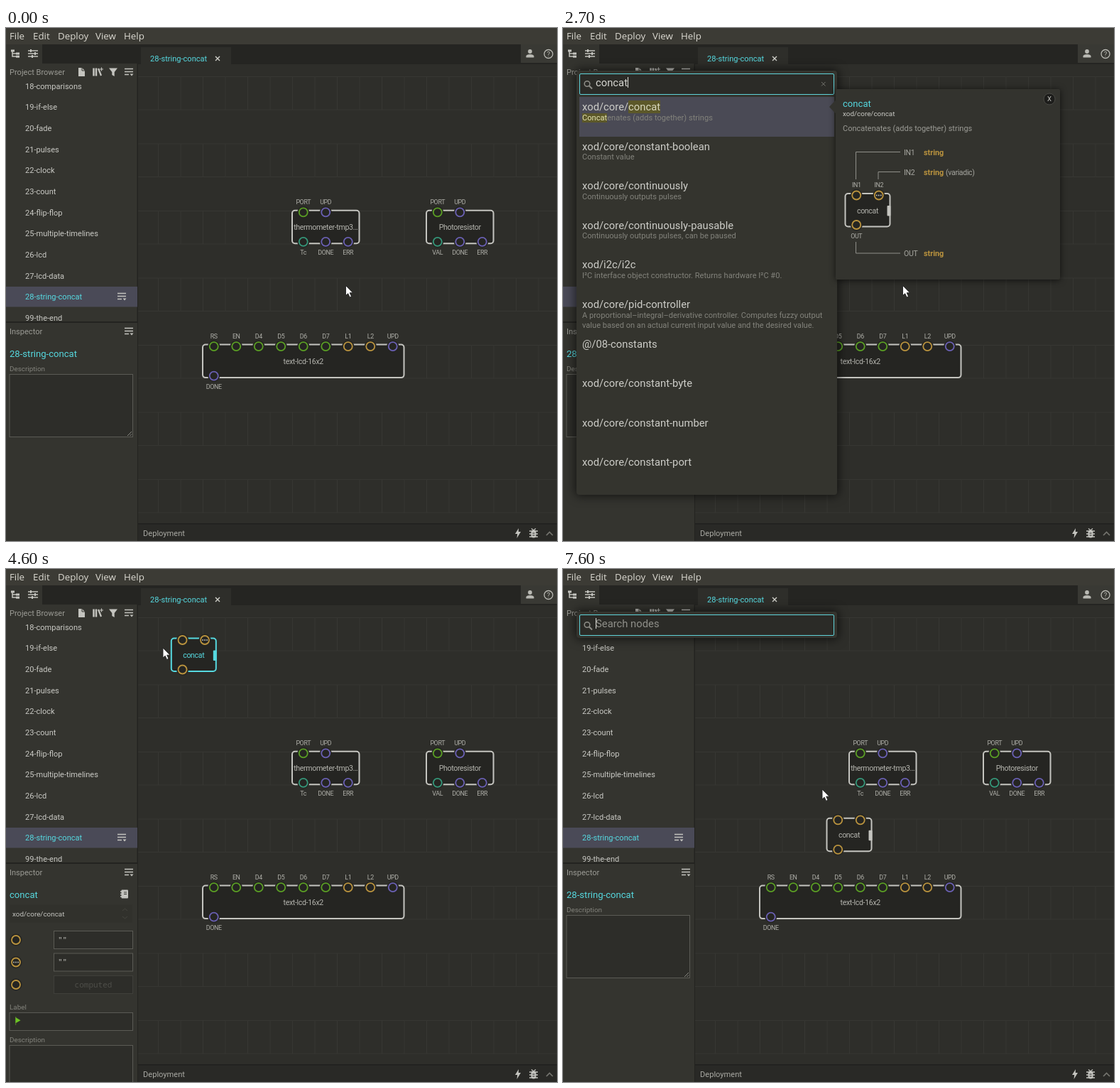
These frames come from a looping animation (776x722 px, 8 s). An HTML page:

```html
<!DOCTYPE html>
<html lang="en">
<head>
<meta charset="utf-8">
<title>Patch editor</title>
<style>
html, body { margin: 0; width: 100%; height: 100%; overflow: hidden; background: #2e2e2a; }
body { position: relative; font-family: Roboto, "Noto Sans", sans-serif; }
svg { position: absolute; left: 0; top: 0; overflow: visible; }
svg text { white-space: pre; }
.cn { letter-spacing: -.35px; }
.menu { font-family: "Open Sans", "Noto Sans", sans-serif; }
.mono { font-family: "Noto Sans Mono", "DejaVu Sans Mono", monospace; }
#popup { position: absolute; left: 19px; top: 60px; width: 367px; background: #34342e; border-radius: 4px; box-shadow: 0 0 14px 2px rgba(0,0,0,.6); overflow: hidden; }
#popup div { position: absolute; white-space: pre; }
#input { left: 3.5px; top: 3.5px; width: 357px; height: 28px; border: 1.5px solid #5fd3da; border-radius: 2px; background: #2b2b27; }
#query { left: 27px; top: 7px; font-size: 14.8px; line-height: 20px; color: #d6d6d1; }
#query.empty { color: #8f8f89; }
#query i { display: inline-block; width: 1px; height: 15px; background: #e0e0da; vertical-align: -2px; margin-right: -1px; }
.row { left: 4px; width: 359px; height: 55.6px; }
.row.on { background: #4a4a55; }
.name { left: 4px; top: 4px; font-size: 14.8px; line-height: 20px; color: #cdcdc8; }
.about { left: 4px; top: 22.5px; font-size: 11.1px; line-height: 14px; color: #83837c; }
mark { background: #5c5829; color: #d9d8bd; }
.about mark { color: #e6e5b4; }
#bar { left: 355px; top: 38px; width: 6px; height: 363px; border-radius: 3px; background: #797973; }
</style>
</head>
<body>
<svg id="stage" width="776" height="722"></svg>
<div id="popup"></div>
<svg id="over" width="776" height="722"></svg>
<script>
const $ = id => document.getElementById(id);
const SLOT = 31.5, CYAN = '#56d9e0', PALE = '#c4c4bf', DIM = '#83837c', DARK = '#252522';
const HUE = { g: '#5a9e24', p: '#6a60b4', t: '#35987a', o: '#ba933e', b: '#93609b' };

const text = (x, y, s, size, fill, more = '') =>
  `<text x="${x}" y="${y + size * .345}" font-size="${size}" fill="${fill}" ${more}>${s}</text>`;
const mid = 'text-anchor="middle" class="cn"';
const rect = (x, y, w, h, fill, more = '') =>
  `<rect x="${x}" y="${y}" width="${w}" height="${h}" fill="${fill}" ${more}/>`;
const line = (d, color = PALE, width = 1.5, fill = 'none') =>
  `<path d="${d}" stroke="${color}" stroke-width="${width}" fill="${fill}"/>`;
const solid = (d, fill = PALE) => `<path d="${d}" fill="${fill}"/>`;
const at = (x, y, body) => `<g transform="translate(${x} ${y})">${body}</g>`;
const field = (x, y, w, h, edge = '#5b5b55') => rect(x, y, w, h, '#2d2d29', `stroke="${edge}"`);

function port(x, y, hue, dots) {
  const dot = d => `<circle cx="${x + d}" cy="${y}" r=".9" fill="${PALE}"/>`;
  return `<circle cx="${x}" cy="${y}" r="8.5" fill="${DARK}"/>` +
    `<circle cx="${x}" cy="${y}" r="6" fill="${DARK}" stroke="${HUE[hue]}" stroke-width="1.8"/>` +
    (dots ? [-3, 0, 3].map(dot).join('') : '');
}

// Ports are written "LABEL:hue"; "+" after the hue marks a variadic port.
function node(x, y, slots, label, ins, outs, o = {}) {
  const edge = o.edge || PALE, w = slots * SLOT;
  const row = (list, py, ly) => list.split(' ').filter(Boolean).map((p, i) => {
    const [name, hue] = p.split(':'), px = x + SLOT * (i + .5);
    return port(px, y + py, hue[0], hue[1]) + text(px, y + ly, name, 8.9, '#b0b0aa', mid);
  }).join('');
  return rect(x, y, w, 46.5, DARK, `rx="4" stroke="${edge}" stroke-width="2"`) +
    (o.grip ? rect(x + w - 4, y + 17, 5, 14.5, edge, 'rx="1"') : '') +
    text(x + w / 2, y + 24, label, 10.6, o.edge || '#b4b4ae', mid) +
    row(ins, 2.5, -12) + row(outs, 44, 59.5);
}

const listIcon = line('M-6-4.5h12M-6-.5h12M-6 3.5h6') + solid('M1.5 2.5h5l-2.5 3z');

function backdrop() {
  let grid = '';
  for (let k = 0; k < 7; k++) {
    const y = 68.5 + k * 94.5;
    grid += `M186 ${y}H776M186 ${y + 46.5}H776`;
    for (let x = 214.5; x < 776; x += SLOT) grid += `M${x} ${y}v46.5`;
  }
  const files = ['18-comparisons', '19-if-else', '20-fade', '21-pulses', '22-clock', '23-count', '24-flip-flop',
    '25-multiple-timelines', '26-lcd', '27-lcd-data', '28-string-concat', '99-the-end'];
  const menus = [[5, 'File'], [38, 'Edit'], [73, 'Deploy'], [126, 'View'], [166, 'Help']];
  return rect(186, 50, 590, 648, '#2e2e2a') + line(grid, '#373733', 1) +
    rect(0, 23, 776, 28, '#252522') + rect(0, 23, 51, 28, '#34342f') +
    rect(190, 27, 127, 24, '#2e2e2a') + rect(725, 23, 51, 26, '#393934') +
    rect(0, 0, 776, 23, '#3c3b35') +
    menus.map(([x, s]) => text(x, 11, s, 13.3, '#dcdad2', 'class="menu"')).join('') +
    text(203, 43, '28-string-concat', 11.05, CYAN) +
    line('M295 40l6 6M301 40l-6 6', '#d0d0ca', 1.4) +
    rect(0, 50, 185, 672, '#34342f') + rect(184.5, 50, 1.5, 672, '#232320') +
    at(13, 36, line('M-4-4V4H2M-4 0H2') + rect(-6, -5.5, 5, 3, PALE) + rect(1, -1.5, 5, 3, PALE) + rect(1, 2.7, 5, 3, PALE)) +
    at(38, 36, line('M-7-4H7M-7 0H7M-7 4H7') + line('M-3-6v4M3-2v4M-1 2v4', PALE, 2)) +
    at(738, 36, `<circle cy="-3" r="2.9" fill="#b9b9b3"/>` + solid('M-5.5 5.5V3.5Q-5 1 0 1T5.5 3.5V5.5z', '#b9b9b3')) +
    `<circle cx="764" cy="36.5" r="6" fill="none" stroke="#b9b9b3" stroke-width="1.3"/>` +
    text(764, 36.5, '?', 9.5, '#b9b9b3', 'text-anchor="middle"') +
    text(5, 62, 'Project Browser', 11.05, '#9b9b95') +
    at(106, 62, solid('M-4-6H1L5-2V6H-4z') + line('M1-6V-2H5', '#34342f', 1)) +
    at(128, 62, line('M-4.5-5.5V5.5M-1-5.5V5.5', PALE, 2.5) + line('M2-5L6 5', PALE, 2.2) + line('M4-4h5M6.5-6.5v5', PALE, 1.2)) +
    at(151, 62, solid('M-6-5.5H6L1.7 0V6L-1.7 4V0z')) + at(173, 62, listIcon) +
    rect(0, 364, 185, 28.5, '#4a4a57') +
    files.map((s, i) => text(27, 82 + i * 29.65, s, 11.05, i == 10 ? CYAN : '#c9c9c4')).join('') +
    at(163, 378, listIcon) +
    rect(0, 413, 185, 309, '#34342f') + rect(0, 413, 185, 2, '#232320') +
    text(5, 427.5, 'Inspector', 11.05, '#9b9b95') + at(173, 427, listIcon) +
    rect(186, 697.5, 590, 24.5, '#292926') + rect(186, 697, 590, 1.5, '#20201e') +
    text(193, 711.5, 'Deployment', 11.1, '#a9a9a3') +
    at(721, 711, solid('M1-7L-4 1H-.8L-1.5 7L4-2H.7z')) +
    at(743, 711, line('M-6-3H6M-6 1H6M-6 5H6M-3-6.5L0-4L3-6.5', PALE, 1.3) + rect(-3.5, -4.5, 7, 11, PALE, 'rx="3.5"') + line('M-1.5 0h3M-1.5 3h3', '#292926', 1)) +
    line('M761 714l4.5-4.5 4.5 4.5', '#74746e', 1.7) +
    node(403, 256.8, 3, 'thermometer-tmp3…', 'PORT:g UPD:p', 'Tc:t DONE:p ERR:p') +
    node(592, 256.8, 3, 'Photoresistor', 'PORT:g UPD:p', 'VAL:t DONE:p ERR:p') +
    node(277, 445.6, 9, 'text-lcd-16x2', 'RS:g EN:g D4:g D5:g D6:g D7:g L1:o L2:o UPD:p', 'DONE:p');
}

const patchInfo = text(5, 458, '28-string-concat', 13.1, CYAN) + text(5, 480, 'Description', 9.9, DIM) +
  field(5, 487.5, 173.5, 88) + line('M171 574l6-6M174.5 574l2.5-2.5', '#8a8a84', 1);

const nodeInfo = text(5, 458, 'concat', 13.1, CYAN) +
  at(167, 457.5, rect(-4.5, -6, 9.5, 12, PALE, 'rx="1"') + line('M-6-3.5h3M-6 0h3M-6 3.5h3', PALE, 1.3) + line('M-1-2.5h4M-1 0h4', '#34342f', 1.2)) +
  rect(5, 472.5, 173, 25, '#31312c') + text(9, 485.5, 'xod/core/concat', 9.9, '#c4c4bf') +
  line('M164 481l3.5-3 3.5 3M164 489l3.5 3 3.5-3', '#45453f', 1) +
  [522, 553.5, 585].map((y, i) => port(14, y, 'o', i == 1) +
    field(67.5, y - 12.5, 111, 25, i < 2 ? '#5b5b55' : '#3f3f3a') +
    (i < 2 ? text(73, y, '""', 11, '#c4c4bf', 'class="mono"')
      : text(123, y + .5, 'computed', 11, '#4e4e49', 'class="mono" text-anchor="middle"'))).join('') +
  text(5, 617, 'Label', 9.9, DIM) + field(5, 624.5, 173.5, 25) +
  line('M13.7 630v12', '#58762f', 1) + solid('M13.5 631l7 4.3-7 4z', '#6cc424') +
  text(5, 663, 'Description', 9.9, DIM) + field(5, 670.5, 173.5, 60);

$('stage').innerHTML = backdrop() +
  `<g id="patch">${patchInfo}</g><g id="node">${nodeInfo}</g>` +
  rect(0, 0, 63, 46.5, '#3e7f84', 'id="ghost" rx="4"') +
  `<g id="picked">${node(0, 0, 2, 'concat', ':o :o+', ':o', { edge: CYAN, grip: 1 })}</g>` +
  `<g id="placed">${node(371.5, 350.8, 2, 'concat', ':o :o', ':o', { grip: 1 })}</g>`;
$('over').innerHTML = '<g id="preview"></g><path id="cursor" d="M0 0V14L3.2 11.2L5.6 16.4L8 15.3L5.7 10.2H10z" fill="#fff" stroke="#222" stroke-width=".9"/>';

const about = {
  concat: 'Concatenates (adds together) strings', 'constant-boolean': 'Constant value',
  continuously: 'Continuously outputs pulses', 'continuously-pausable': 'Continuously outputs pulses, can be paused',
  clip: 'Clips an input value so that the value is always inside a [MIN, MAX]\nrange.',
  cos: 'Calculates cosine of an angle.', cube: 'Computes the cube (i.e. x³) of an input value.',
  clock: 'Outputs pulses at regular intervals', 'console-log': 'Outputs a line of text to the board standard debug interface',
  i2c: 'I²C interface object constructor. Returns hardware I²C #0.',
  'pid-controller': 'A proportional–integral–derivative controller. Computes fuzzy output\nvalue based on an actual current input value and the desired value.'
};
const first = ['core/concat', 'core/constant-boolean', 'core/continuously', 'core/continuously-pausable'];
const results = {
  c: [...first, 'math/clip', 'math/cos', 'math/cube', 'core/clock', 'core/console-log', 'core/constant-byte'],
  co: [...first, 'core/console-log', 'core/constant-byte', 'core/constant-number', 'core/constant-port', 'core/constant-pulse', 'core/constant-string'],
  concat: [...first, 'i2c/i2c', 'core/pid-controller', '@/08-constants', 'core/constant-byte', 'core/constant-number', 'core/constant-port']
};

const docs = [
  { ins: 'IN1:o IN2:o+', out: 'OUT:o', type: 'string', end: 475, slots: 2, w: 316, grip: 1 },
  { ins: '', out: 'VAL:b', type: 'boolean', note: 'Constant value', end: 437, slots: 1, w: 278 },
  { ins: '', out: 'TICK:p', type: 'pulse', end: 437, slots: 1, w: 278 },
  { ins: 'EN:b', out: 'TICK:p', type: 'pulse', end: 437, slots: 1, w: 316 }
];

function preview(i) {
  const d = docs[i], y = 86 + i * 55.6, name = first[i].slice(5);
  const ins = d.ins.split(' ').filter(Boolean), n = ins.length;
  const top = y + 74 + (n ? 17 + 28 * n : 0), outY = top + 84, right = 384 + d.w;
  const entry = (p, ry, type) => {
    const [label, hue] = p.split(':'), strike = type == 'boolean' ? ' text-decoration="line-through"' : '';
    return text(d.end + 5, ry, label, 10.6, '#a5a59f', 'class="cn"') +
      text(d.end + 33, ry, type, 10.8, HUE[hue[0]], 'font-weight="700"' + strike) +
      (hue[1] ? text(d.end + 64, ry, '(variadic)', 10.6, '#a5a59f', 'class="cn"') : '');
  };
  return rect(384, y, d.w, outY + (d.note ? 49 : 37) - y, '#33332e', 'rx="2" style="filter:drop-shadow(0 1px 5px rgba(0,0,0,.65))"') +
    solid(`M384.5 ${y + 15}l-9.5 10 9.5 10z`, '#33332e') +
    `<circle cx="${right - 15}" cy="${y + 14}" r="8" fill="#1d1d1b" stroke="#4a4a45"/>` +
    text(right - 15, y + 14, 'X', 9.5, '#c4c4bf', 'text-anchor="middle"') +
    text(394, y + 20, name, 13.1, CYAN) + text(394, y + 35, 'xod/core/' + name, 9.9, '#c9c9c4') +
    text(394, y + 55, about[name], 11, '#9a9a94') +
    ins.map((p, k) => line(`M${412.5 + SLOT * k} ${top - 20}V${y + 88.5 + 28 * k}H${d.end}`, '#8f8f89', 1) +
      entry(p, y + 89 + 28 * k, p[p.indexOf(':') + 1] == 'b' ? 'boolean' : 'string')).join('') +
    line(`M412.5 ${top + 68}V${outY}H${d.end}`, '#8f8f89', 1) + entry(d.out, outY, d.type) +
    (d.note ? text(d.end + 33, outY + 16, d.note, 10.9, '#9a9a94') : '') +
    node(397.5, top, d.slots, i ? name.slice(0, 3) + '…' : name, d.ins, d.out, { grip: d.grip });
}

function popup({ q, sel, caret, scroll, blur }) {
  const list = results[q] || (q ? results.co : []);
  const mark = s => s.replace(new RegExp(q, 'gi'), m => `<mark>${m}</mark>`);
  const beam = caret ? '<i></i>' : '';
  $('popup').style.height = (q ? 597 : 37) + 'px';
  $('popup').innerHTML = `<div id="input" style="${blur ? 'border-color:#5b5b55' : ''}"></div>` +
    `<div id="query" class="${q ? '' : 'empty'}">${q ? q + beam : beam + 'Search nodes'}</div>` +
    '<svg width="367" height="37">' + line('M18 21.5l4 4', '#8f8f89', 2) +
    '<circle cx="15" cy="18.5" r="3.8" fill="none" stroke="#8f8f89" stroke-width="1.5"/>' +
    (q ? line('M345 16l5.5 5.5M350.5 16l-5.5 5.5', '#74746e', 1) : '') + '</svg>' +
    list.map((p, i) => `<div class="row${i == sel ? ' on' : ''}" style="top:${37 + i * 55.6}px">` +
      `<div class="name">${mark(p[0] == '@' ? p : 'xod/' + p)}</div>` +
      `<div class="about">${mark(about[p.split('/').pop()] || '')}</div></div>`).join('') +
    (scroll ? '<div id="bar"></div>' : '');
}

const typed = (q, show, more) => ({ q, sel: 0, caret: 1, doc: show ? 0 : -1, ...more });
const hover = (i, more) => ({ q: 'concat', sel: i, doc: i, caret: 1, scroll: 1, ...more });
const popups = [
  [0, null], [1000, typed('')], [1700, typed('c')], [1800, typed('co')], [1900, typed('co', 1)],
  [2100, typed('con', 1)], [2200, typed('conc', 1)], [2500, typed('conca', 1)], [2700, typed('concat', 1)],
  [3100, typed('concat', 1, { caret: 0 })], [3800, hover(3)], [3900, hover(2)], [4000, hover(1)], [4100, hover(0)],
  [4200, hover(0, { blur: 1, caret: 0 })], [4600, null], [7600, typed('')]
];
const cursor = [
  [0, 478.5, 362.5], [3600, 360, 281.5], [3800, 330, 235], [3900, 272, 162], [4000, 225, 114], [4100, 222, 112],
  [4200, 221, 111], [4800, 225, 113], [4900, 236, 118], [5000, 248, 121], [5100, 257, 119], [5200, 262, 116],
  [5400, 272, 128], [5500, 318, 196], [5600, 392, 298], [5700, 442.5, 358.5], [5800, 436, 360], [5900, 425, 361],
  [6000, 414, 362], [6100, 405, 364], [6200, 401, 366], [6300, 425, 387], [6400, 447, 345], [6500, 425, 290],
  [6600, 385, 257], [6700, 365.5, 300], [7600, 365, 310]
];
const drag = [
  [4600, 232.8, 97.5], [5400, 242, 110], [5500, 287, 180], [5600, 360, 284], [5700, 416.5, 353.5], [5800, 408, 353],
  [5900, 397, 352], [6000, 386, 352], [6100, 377, 351], [6200, 371.5, 350.8]
];
const step = (table, t) => table.findLast(s => s[0] <= t) || table[0];
const snap = (v, from, size) => from + Math.round((v - from) / size) * size;
const move = (id, x, y) => $(id).setAttribute('transform', `translate(${x} ${y})`);
const show = (id, on) => $(id).style.display = on ? '' : 'none';

let current;
function draw() {
  const t = performance.now() % 8000;
  const state = step(popups, t)[1];
  if (state !== current) {
    current = state;
    show('popup', state);
    if (state) popup(state);
    $('preview').innerHTML = state && state.doc >= 0 ? preview(state.doc) : '';
  }
  const [, cx, cy] = step(cursor, t), [, nx, ny] = step(drag, t);
  move('cursor', cx, cy);
  move('picked', nx, ny);
  move('ghost', snap(nx, 277, SLOT), snap(ny, 256.8, 94.5));
  const picked = t >= 4600 && t < 7200, dragging = t >= 5400 && t < 6200;
  show('picked', picked);
  show('node', picked);
  show('patch', !picked);
  show('placed', t >= 7200);
  show('ghost', dragging);
  $('picked').style.filter = dragging ? 'drop-shadow(0 3px 4px rgba(0,0,0,.6))' : '';
  requestAnimationFrame(draw);
}
draw();
</script>
</body>
</html>
```
